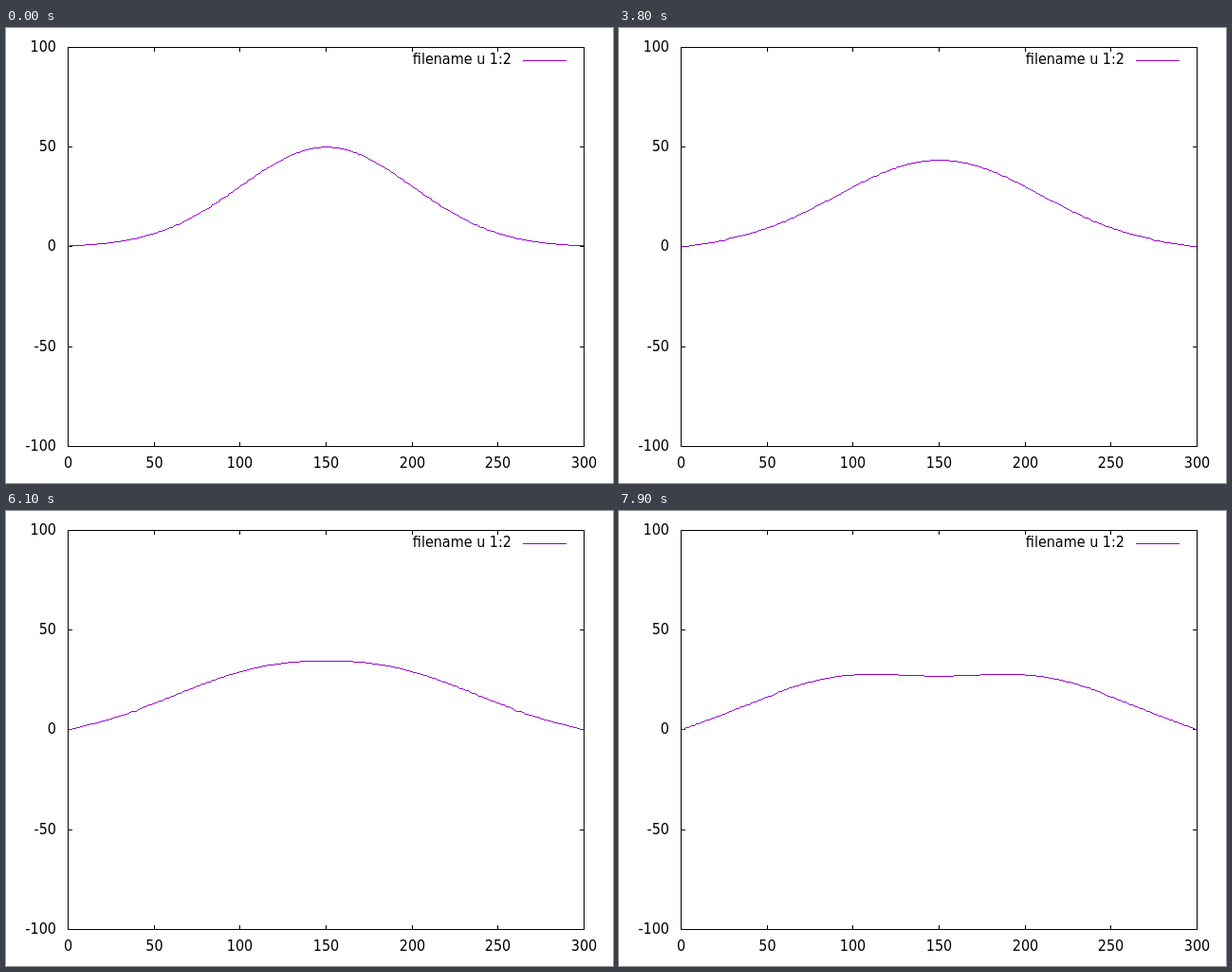
Animation, 640 px wide and 480 px high, one loop 8000 ms. Source, as an HTML page with a canvas:

```html
<!DOCTYPE html>
<html lang="en">
<head>
<meta charset="utf-8">
<title>Wave on a fixed string</title>
<style>
  html, body { margin: 0; width: 100%; height: 100%; overflow: hidden; background: #fff; }
  .plot { position: relative; width: 640px; height: 480px; }
  canvas, svg { position: absolute; left: 0; top: 0; }
  text { font: 16px "DejaVu Sans Condensed", "Open Sans", sans-serif; fill: #000; }
</style>
</head>
<body>
<div class="plot">
  <canvas id="stage" width="640" height="480"></canvas>
  <svg id="labels" width="640" height="480"></svg>
</div>
<script>
const LEFT = 65, RIGHT = 609, TOP = 20, BOTTOM = 441, TIC = 5;
const POINTS = 300, STEP_MS = 100, STEPS = 80, COURANT2 = 0.5;
const PURPLE = '#9400d3';

const ctx = document.getElementById('stage').getContext('2d');
const labels = document.getElementById('labels');

const px = x => Math.floor(LEFT + (RIGHT - LEFT) * x / 300 + 0.5);
const py = v => 479 - Math.floor(249 + (BOTTOM - TOP) * v / 200);

// Wave equation by leapfrog, starting at rest, both ends held at zero.
function simulate() {
  const start = Array.from({ length: POINTS + 1 }, (_, i) =>
    i % POINTS ? 50 * Math.exp(-((i - 150) ** 2) / 5000) : 0);
  const states = [start, start];
  while (states.length < STEPS) {
    const [old, now] = states.slice(-2);
    states.push(now.map((u, i) => i % POINTS
      ? 2 * u - old[i] + COURANT2 * (now[i + 1] - 2 * u + now[i - 1])
      : 0));
  }
  return states;
}

function pixelLine(x0, y0, x1, y1) {
  const dx = x1 - x0, dy = y1 - y0;
  const n = Math.max(Math.abs(dx), Math.abs(dy));
  const along = (d, s) => Math.sign(d) * Math.ceil(Math.abs(d) * s / n - 0.5);
  for (let s = 0; s <= n; s++) {
    ctx.fillRect(x0 + along(dx, s), y0 + along(dy, s), 1, 1);
  }
}

function addLabel(text, x, y, anchor) {
  const el = document.createElementNS(labels.namespaceURI, 'text');
  el.setAttribute('x', x);
  el.setAttribute('y', y);
  el.setAttribute('text-anchor', anchor);
  el.textContent = text;
  labels.append(el);
}

function drawTics() {
  ctx.fillStyle = '#000';
  for (let x = 50; x < 300; x += 50) {
    ctx.fillRect(px(x), TOP, 1, TIC);
    ctx.fillRect(px(x), BOTTOM - TIC + 1, 1, TIC);
  }
  for (let v = -50; v <= 50; v += 50) {
    ctx.fillRect(LEFT, py(v), TIC, 1);
    ctx.fillRect(RIGHT - TIC + 1, py(v), TIC, 1);
  }
}

function drawCurve(u) {
  ctx.fillStyle = PURPLE;
  ctx.fillRect(545, 34, 46, 1);
  for (let i = 0; i < POINTS; i++) {
    pixelLine(px(i), py(u[i]), px(i + 1), py(u[i + 1]));
  }
}

function drawBorder() {
  ctx.strokeStyle = '#000';
  ctx.strokeRect(LEFT + 0.5, TOP + 0.5, RIGHT - LEFT, BOTTOM - TOP);
}

for (let x = 0; x <= 300; x += 50) addLabel(x, px(x) + 0.5, 464, 'middle');
for (let v = -100; v <= 100; v += 50) addLabel(v, 53, py(v) + 5, 'end');
addLabel('filename u 1:2', 533, 38, 'end');

const states = simulate();
let shown = -1;

function render(now) {
  const step = Math.floor(now / STEP_MS) % STEPS;
  if (step !== shown) {
    shown = step;
    ctx.clearRect(0, 0, 640, 480);
    drawTics();
    drawCurve(states[step]);
    drawBorder();
  }
  requestAnimationFrame(render);
}
render(performance.now());
</script>
</body>
</html>
```
